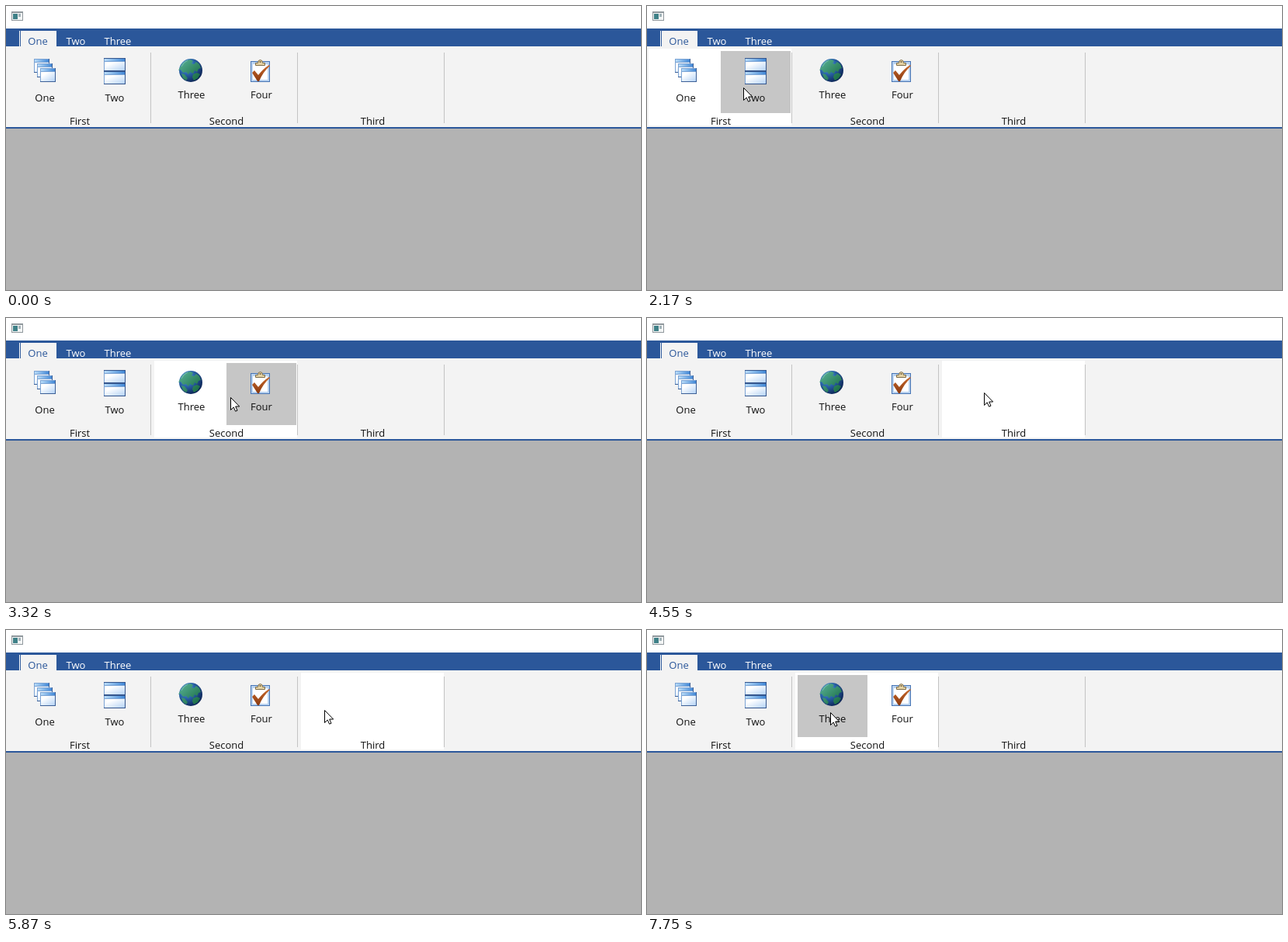
An HTML page that plays this animation: 818x366 px, repeating every 8 s.

```html
<!DOCTYPE html>
<html lang="en">
<head>
<meta charset="utf-8">
<title>Ribbon</title>
<style>
  html, body { margin: 0; width: 100%; height: 100%; overflow: hidden; background: #b3b3b3; }
  svg { display: block; }
  text { font: 13px "Open Sans", "Noto Sans", sans-serif; text-anchor: middle; fill: #111; }
  .tabs text { fill: #fff; }
  .tabs .on { fill: #2b579a; }
  rect { shape-rendering: crispEdges; }
  .group, .button { visibility: hidden; }
  .group { fill: #fff; }
  .button { fill: #c6c6c6; }
  .hot { visibility: visible; }
</style>
</head>
<body>
<svg width="818" height="366" viewBox="0 0 818 366">
  <defs>
    <linearGradient id="bar">
      <stop offset="0" stop-color="#b9dcf8"/>
      <stop offset="1" stop-color="#3f86d6"/>
    </linearGradient>
    <linearGradient id="pane" x2="1" y2="1">
      <stop offset=".25" stop-color="#fff"/>
      <stop offset="1" stop-color="#b5d3f5"/>
    </linearGradient>
    <radialGradient id="sea" cx=".32" cy=".3" r=".75">
      <stop offset="0" stop-color="#7db4e6"/>
      <stop offset=".45" stop-color="#2c68ae"/>
      <stop offset="1" stop-color="#0c2456"/>
    </radialGradient>
    <linearGradient id="land" x2="1" y2="1">
      <stop offset="0" stop-color="#5cb59a"/>
      <stop offset="1" stop-color="#14663c"/>
    </linearGradient>
    <linearGradient id="check" x2="0" y2="1">
      <stop offset="0" stop-color="#c9692c"/>
      <stop offset="1" stop-color="#8a3a10"/>
    </linearGradient>
    <g id="small">
      <rect width="20" height="18" fill="#3c5f96"/>
      <rect width="19" height="17" fill="#7ba3d4"/>
      <rect x="1" y="1" width="18" height="3" fill="url(#bar)"/>
      <rect x="1" y="5" width="18" height="12" fill="url(#pane)"/>
    </g>
    <g id="wide">
      <rect width="28" height="17" fill="#34558c"/>
      <rect y="1" width="27" height="15" fill="#7ba3d4"/>
      <rect x="1" y="1" width="26" height="3" fill="url(#bar)"/>
      <rect x="1" y="5" width="26" height="11" fill="url(#pane)"/>
    </g>
  </defs>

  <rect width="818" height="29" fill="#fff"/>
  <rect x="7" y="7" width="15" height="12" fill="#8f979c"/>
  <rect x="8" y="9" width="13" height="9" fill="#f4f6f6"/>
  <rect x="9" y="10" width="6" height="7" fill="#3f8087"/>
  <rect x="16" y="10" width="3" height="4" fill="#a3b3b8"/>

  <rect y="29" width="818" height="23" fill="#2b579a"/>
  <rect x="17" y="32" width="1" height="20" fill="#fff"/>
  <rect x="19" y="32" width="46" height="20" fill="#f3f3f3"/>
  <g class="tabs">
    <text class="on" x="41" y="50">One</text>
    <text x="90" y="50">Two</text>
    <text x="144" y="50">Three</text>
  </g>

  <rect y="52" width="818" height="104" fill="#f3f3f3"/>
  <rect y="156" width="818" height="2" fill="#2b579a"/>
  <rect y="158" width="818" height="208" fill="#b3b3b3"/>

  <rect class="group" x="2" y="55" width="184" height="99"/>
  <rect class="group" x="191" y="55" width="184" height="99"/>
  <rect class="group" x="380" y="55" width="184" height="99"/>
  <rect class="button" x="5" y="58" width="90" height="80"/>
  <rect class="button" x="95" y="58" width="90" height="80"/>
  <rect class="button" x="194" y="58" width="90" height="80"/>
  <rect class="button" x="284" y="58" width="90" height="80"/>

  <g fill="#c3c3c3">
    <rect x="186" y="60" width="1" height="91"/>
    <rect x="375" y="60" width="1" height="91"/>
    <rect x="564" y="60" width="1" height="91"/>
  </g>

  <use href="#small" x="36" y="68"/>
  <use href="#small" x="40" y="74"/>
  <use href="#small" x="44" y="80"/>
  <use href="#wide" x="126" y="67"/>
  <use href="#wide" x="126" y="84"/>

  <circle cx="238" cy="83" r="15" fill="url(#sea)"/>
  <path fill="url(#land)" d="M227 74l5-4 6-1 3 2-2 3 3 1 3-3 4 3 2 5-3 1-2 4-3-2-2 4-4-2-2 3-3-3-4 1-3-4-3 1z
    M241 88l5-2 4 2-3 5-5 3-2-4z M226 87l4 1 4 5-2 3-4-3z"/>
  <path fill="none" stroke="#9fd0e8" stroke-opacity=".5" d="M226 78q3-6 8-8"/>

  <rect x="315" y="71" width="25" height="27" fill="#4674b4"/>
  <rect x="316" y="72" width="23" height="25" fill="#b8d2f0"/>
  <rect x="318" y="75" width="19" height="20" fill="#fff"/>
  <path fill="#e6d3a4" stroke="#7c6a45" d="M321.500 76.500v-3h3q0-4 3-4t3 4h3v3z"/>
  <circle cx="327.500" cy="72" r="1" fill="#6b5a3a"/>
  <path fill="url(#check)" d="M317 86l3-3 5 6q6-8 14-13l1 1q-9 8-14 20h-2z"/>

  <text x="50" y="123">One</text>
  <text x="140" y="123">Two</text>
  <text x="239" y="119">Three</text>
  <text x="329" y="119">Four</text>
  <text x="95" y="153">First</text>
  <text x="284" y="153">Second</text>
  <text x="472.500" y="153">Third</text>

  <path id="cursor" visibility="hidden" fill="#fff" stroke="#000"
    d="M.5 .5v16l3.700-3.600 2.400 5.300 2.400-1-2.300-5.200h5z"/>
</svg>
<script>
  const LOOP = 8000;
  const smooth = u => u * u * (3 - 2 * u);
  const easeIn = u => u * u;
  const easeOut = u => u * (2 - u);

  // Each move: first step, last step, step count, end point, easing.
  const start = [174, 365];
  const moves = [
    [600, 1240, 9, [56, 99], smooth],
    [1860, 2320, 7, [141, 107], smooth],
    [2620, 2780, 3, [245, 104], smooth],
    [3240, 3720, 7, [335, 100], easeOut],
    [3940, 4190, 4, [423, 97], smooth],
    [4330, 4410, 2, [433, 94], smooth],
    [4550, 5110, 8, [504, 268], easeIn],
    [5250, 5870, 9, [410, 103], smooth],
    [6200, 6570, 6, [328, 105], smooth],
    [7050, 7350, 5, [237, 106], smooth],
    [7750, 7750, 1, [236, 106], smooth]
  ];

  function pointAt(t) {
    let from = start, pos = null;
    for (const [begin, end, count, to, ease] of moves) {
      if (t < begin) break;
      const gap = (end - begin) / (count - 1) || 1;
      const step = Math.min(count, Math.floor((t - begin) / gap + 1e-6) + 1);
      const k = ease(step / count);
      pos = from.map((v, i) => Math.floor(v + (to[i] - v) * k));
      from = to;
    }
    return pos;
  }

  const cursor = document.getElementById("cursor");
  const areas = [...document.querySelectorAll(".group, .button")].map(el => {
    const [x, y, w, h] = ["x", "y", "width", "height"].map(a => +el.getAttribute(a));
    return { el, hit: p => p[0] >= x && p[0] < x + w && p[1] >= y && p[1] < y + h };
  });

  function draw(t) {
    const p = pointAt(t);
    cursor.setAttribute("visibility", p ? "visible" : "hidden");
    if (p) cursor.setAttribute("transform", `translate(${p})`);
    for (const { el, hit } of areas) el.classList.toggle("hot", !!p && hit(p));
  }

  const origin = performance.now();
  function tick() {
    draw((performance.now() - origin) % LOOP);
    requestAnimationFrame(tick);
  }
  tick();
</script>
</body>
</html>
```
